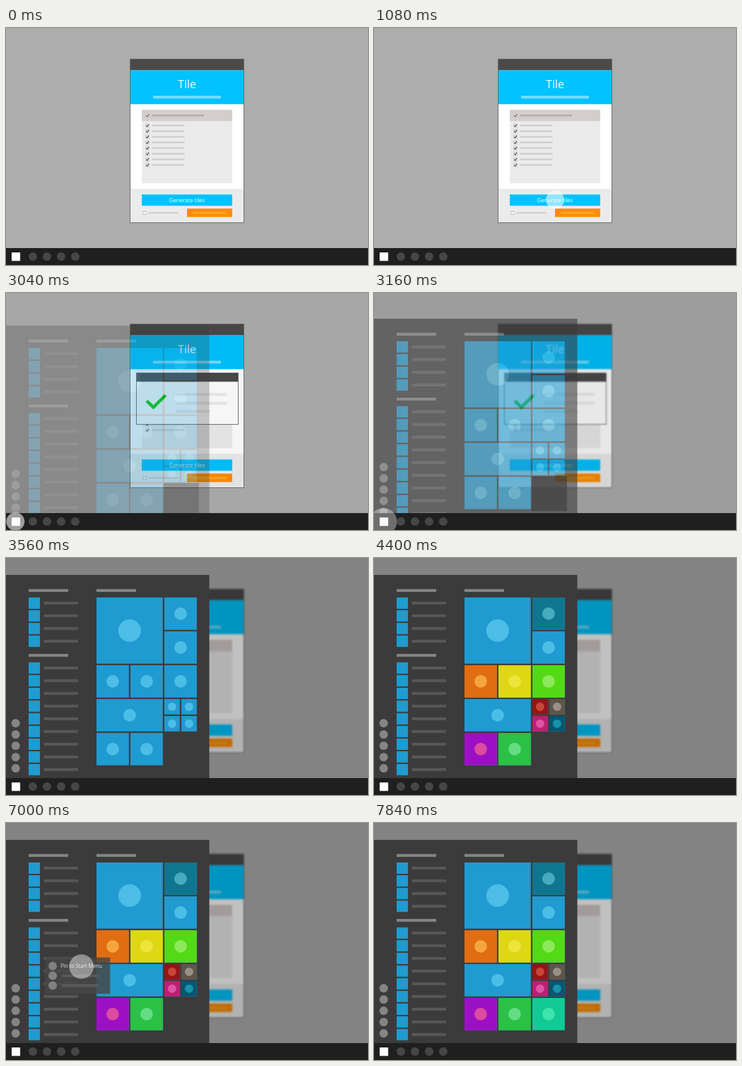
An HTML page with a canvas for the animation above (8000 ms loop, 576 by 378 pixels).

```html
<!DOCTYPE html>
<html lang="en">
<head>
<meta charset="utf-8">
<title>Tile generator</title>
<style>
html, body { margin: 0; width: 576px; height: 378px; overflow: hidden; background: #adadad; }
canvas { display: block; }
</style>
</head>
<body>
<canvas id="stage" width="576" height="378"></canvas>
<script>
const W = 576, H = 378, LOOP = 8000;
const BLUE = '#209bd1', BLUE_DOT = '#4cbde6', CYAN = '#00c3ff';
const FONT = '"Open Sans", "Noto Sans", sans-serif';
const stage = document.getElementById('stage').getContext('2d');
const desk = layer(), menu = layer();

// x, y, width, height, dot radius, final colour, final dot colour
const TILES = [
  [144, 63, 105.5, 105.5, 18],
  [252, 63, 51.6, 51.6, 10, '#0f768f', '#47abbf'],
  [252, 117, 51.6, 51.6, 10],
  [144, 171, 51.6, 51.6, 10, '#e06d12', '#f5a53e'],
  [198, 171, 51.6, 51.6, 10, '#dfd713', '#ebe53e'],
  [252, 171, 51.6, 51.6, 10, '#53d915', '#8de85a'],
  [144, 225, 105.5, 51.6, 10],
  [252, 225, 24.6, 24.6, 6.7, '#941417', '#c4473a'],
  [279, 225, 24.6, 24.6, 6.7, '#5f544a', '#9a8f84'],
  [252, 252, 24.6, 24.6, 6.7, '#bf1d72', '#de54a2'],
  [279, 252, 24.6, 24.6, 6.7, '#045672', '#1792a8'],
  [144, 279, 51.6, 51.6, 10, '#9c10c4', '#dc4b9e'],
  [198, 279, 51.6, 51.6, 10, '#2bc046', '#64dc83']
];
const NEW_TILE = [252, 279, 51.6, 51.6, 10];

function layer() {
  const c = document.createElement('canvas');
  c.width = W;
  c.height = H;
  return c.getContext('2d');
}

const ramp = (t, a, b) => Math.min(1, Math.max(0, (t - a) / (b - a)));
const easeOut = p => 1 - (1 - p) * (1 - p);

function rect(g, x, y, w, h, color) {
  g.fillStyle = color;
  g.fillRect(x, y, w, h);
}

function dot(g, x, y, r, color) {
  g.fillStyle = color;
  g.beginPath();
  g.arc(x, y, r, 0, Math.PI * 2);
  g.fill();
}

function line(g, points, width, color) {
  g.strokeStyle = color;
  g.lineWidth = width;
  g.beginPath();
  points.forEach(([x, y]) => g.lineTo(x, y));
  g.stroke();
}

function frame(g, x, y, w, h, color) {
  g.strokeStyle = color;
  g.lineWidth = 1;
  g.strokeRect(x, y, w, h);
}

function text(g, s, x, y, size, align) {
  g.font = size + 'px ' + FONT;
  g.textAlign = align;
  g.fillStyle = '#fff';
  g.fillText(s, x, y);
}

function fade(g, alpha, draw) {
  if (alpha <= 0) return;
  g.save();
  g.globalAlpha *= alpha;
  draw();
  g.restore();
}

function checkbox(g, x, y, checked) {
  rect(g, x - 3, y - 3, 6, 6, '#fff');
  frame(g, x - 2.5, y - 2.5, 5, 5, '#b5b5b5');
  if (checked) line(g, [[x - 1.7, y], [x - 0.4, y + 1.5], [x + 2, y - 1.8]], 1.1, '#222');
}

function drawWindow(g) {
  rect(g, 198, 49, 180.5, 262, '#fff');
  rect(g, 198, 49, 180.5, 18.5, '#4a4a4a');
  rect(g, 198, 67.5, 180.5, 54, CYAN);
  text(g, 'Tile', 288, 96, 18, 'center');
  rect(g, 234, 108, 108, 4.5, '#73deff');

  rect(g, 216, 130.5, 144, 117, '#ebebeb');
  rect(g, 216, 130.5, 144, 18, '#d5cdcd');
  checkbox(g, 225, 139.5, true);
  rect(g, 232, 138, 83, 3, '#b7b0b0');
  for (let i = 0; i < 8; i++) {
    const y = 155.5 + i * 9;
    checkbox(g, 225, y, true);
    rect(g, 232, y - 1.5, 52, 3, '#d2d2d2');
  }

  rect(g, 198, 256.5, 180.5, 54, '#ebebeb');
  rect(g, 216, 265.5, 144, 18, CYAN);
  text(g, 'Generate tiles', 288, 277.7, 8.8, 'center');
  checkbox(g, 220.5, 295, false);
  rect(g, 227, 293.5, 47.5, 2.7, '#d2d2d2');
  rect(g, 288, 288, 72, 13.5, '#ff8c00');
  rect(g, 297, 293, 54, 4, '#ffa320');
  frame(g, 197.5, 49.5, 181, 261, '#666');
}

function drawDialog(g) {
  rect(g, 207.5, 127.5, 162.5, 82, '#fff');
  rect(g, 207.5, 127.5, 162.5, 14, '#4a4a4a');
  frame(g, 207.5, 127.5, 162, 82, '#666');
  line(g, [[224, 172], [234.5, 182.3], [254, 163]], 5, '#10d000');
  rect(g, 270.5, 159.5, 81, 4.5, '#ebebeb');
  rect(g, 270.5, 173.5, 81, 4.5, '#ebebeb');
  rect(g, 270.5, 186.5, 54, 4.5, '#ebebeb');
}

function drawTile(g, [x, y, w, h, r], color, dotColor) {
  rect(g, x, y, w, h, color);
  dot(g, x + w / 2, y + h / 2, r, dotColor);
}

function drawItems(g, top, count) {
  for (let i = 0; i < count; i++) {
    const y = top + i * 20.25;
    rect(g, 36, y, 18, 18, BLUE);
    rect(g, 60, y + 6.7, 54.7, 4.5, '#575757');
  }
}

function drawMenu(g, t) {
  rect(g, 0, 27, 323.5, 351, '#3b3b3b');
  for (const [x, y] of [[36, 49.5], [36, 153], [144, 49.5]]) rect(g, x, y, 63, 4.5, '#848484');
  drawItems(g, 63, 4);
  drawItems(g, 166.5, 9);
  for (let i = 0; i < 5; i++) dot(g, 15.4, 263.4 + i * 18, 6.75, '#858585');

  const tint = ramp(t, 4040, 4400);
  for (const tile of TILES) {
    drawTile(g, tile, BLUE, BLUE_DOT);
    if (tile[5]) fade(g, tint, () => drawTile(g, tile, tile[5], tile[6]));
  }
  fade(g, ramp(t, 7040, 7360), () => drawTile(g, NEW_TILE, '#12ca96', '#3ee3a9'));
}

function drawContext(g) {
  rect(g, 62.5, 214.5, 103, 58, '#474747');
  for (let i = 0; i < 3; i++) {
    const y = 228 + i * 15.6;
    dot(g, 74.3, y, 6.75, '#8f8f8f');
    if (i) rect(g, 88.5, y - 2.2, 59, 4.5, '#5e5e5e');
  }
  text(g, 'Pin to Start Menu', 86.7, 231, 8.2, 'left');
}

function drawTaskbar(g) {
  rect(g, 0, 351, W, 27, '#1f1f1f');
  for (let i = 0; i < 4; i++) dot(g, 42.7 + i * 22.5, 364.5, 6.75, '#464646');
}

function ripple(g, t, start, x, y) {
  const p = ramp(t, start, start + 480);
  if (p <= 0 || p >= 1) return;
  fade(g, 0.85 * (1 - p), () => dot(g, x, y, 26 * easeOut(p), '#fff'));
}

function render(t) {
  const g = stage;
  const dim = ramp(t, 2960, 3500);
  const open = easeOut(ramp(t, 2960, 3520));

  rect(desk, 0, 0, W, H, '#adadad');
  drawWindow(desk);
  fade(desk, ramp(t, 1240, 1640) * (1 - ramp(t, 3160, 3540)), () => drawDialog(desk));

  g.drawImage(desk.canvas, 0, 0);
  if (dim > 0) {
    g.save();
    g.filter = `blur(${1.6 * Math.sqrt(dim)}px)`;
    g.drawImage(desk.canvas, 0, 0);
    g.restore();
    fade(g, 0.243 * dim, () => rect(g, 0, 0, W, H, '#000'));
  }
  ripple(g, t, 920, 288, 274);

  if (open > 0) {
    const drop = 34 * (1 - open);
    menu.clearRect(0, 0, W, H);
    drawMenu(menu, t);
    fade(g, open, () => {
      g.drawImage(menu.canvas, 0, drop);
      if (open < 1) rect(g, 250.5, 278 + drop, 56.5, 56, '#3b3b3b');
    });
  }

  fade(g, ramp(t, 5560, 5880) * (1 - ramp(t, 6960, 7200)), () => drawContext(g));
  ripple(g, t, 5400, 60, 216);
  ripple(g, t, 6760, 120, 229);

  drawTaskbar(g);
  ripple(g, t, 2880, 15, 364.5);
  rect(g, 9, 358, 13.5, 13.5, '#fff');
}

const begin = performance.now();
function tick() {
  render((performance.now() - begin) % LOOP);
  requestAnimationFrame(tick);
}
tick();
</script>
</body>
</html>
```
